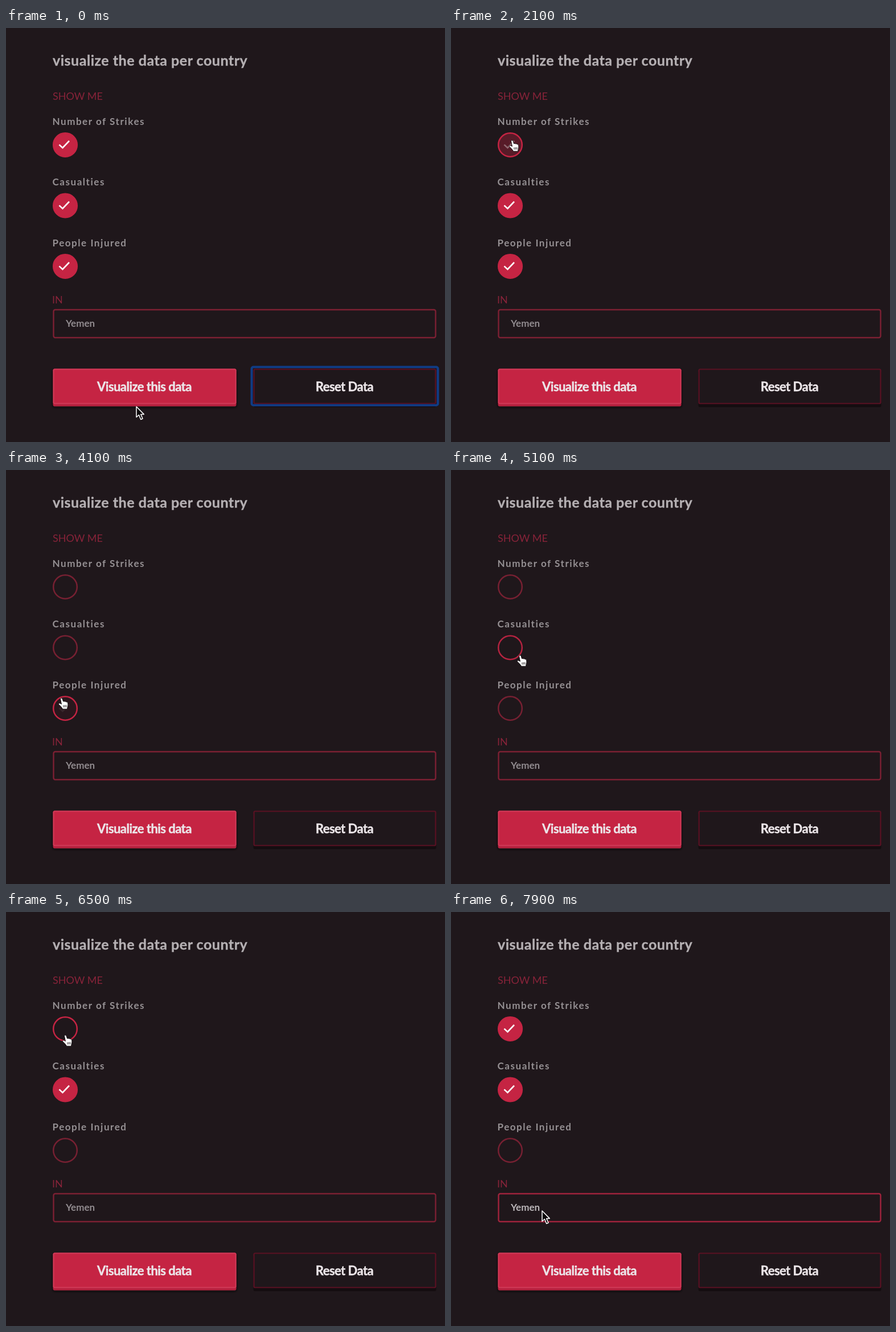
These frames come from a looping animation (771 by 726 pixels, 8000 ms). An HTML page:

```html
<!DOCTYPE html>
<html lang="en">
<head>
<meta charset="utf-8">
<style>
  html, body { margin: 0; height: 100%; overflow: hidden; background: #1f171b; }
  svg { display: block; width: 771px; height: 726px; font: 700 17px Lato, "Open Sans", sans-serif; }
  .title { font-size: 25px; letter-spacing: .52px; fill: #b5b0b3; stroke: #b5b0b3; stroke-width: .35px; }
  .head { font-size: 18px; font-weight: 400; fill: #872339; }
  .label { letter-spacing: 1.55px; fill: #959093; }
  .button { font-size: 22px; letter-spacing: -.55px; text-anchor: middle; fill: #ece6e9; stroke: #ece6e9; stroke-width: .45px; }
</style>
</head>
<body>
<svg viewBox="0 0 771 726">
  <defs>
    <filter id="soft" x="-10%" y="-30%" width="120%" height="160%"><feGaussianBlur stdDeviation="2"/></filter>
    <filter id="glow" x="-5%" y="-20%" width="110%" height="140%"><feGaussianBlur stdDeviation=".7"/></filter>
  </defs>

  <text class="title" x="82" y="66">visualize the data per country</text>
  <text class="head" x="82" y="126">SHOW ME</text>
  <text class="head" x="81" y="482.5">IN</text>
  <g id="checks"></g>

  <rect id="field" x="83.5" y="494" width="671" height="49" rx="3" fill="none" stroke-width="2.4"/>
  <text id="country" x="105" y="523.5">Yemen</text>

  <rect x="82.5" y="600" width="322" height="65" rx="3" fill="#0d080a" filter="url(#soft)"/>
  <rect x="82.5" y="597.5" width="322" height="66" rx="3" fill="#b7213f"/>
  <rect x="83.5" y="598.5" width="320" height="60" rx="2" fill="#c52443" stroke="#d13a58" stroke-width="2"/>
  <text class="button" x="243" y="636.5">Visualize this data</text>

  <rect x="434.5" y="602" width="321" height="63" rx="3" fill="#140d10"/>
  <rect x="435.5" y="598.5" width="319" height="60" rx="2" fill="#1f171b" stroke="#5a1123" stroke-width="2.2"/>
  <rect id="focus" x="431.5" y="594.5" width="327" height="67" rx="3" fill="none" stroke="#103c86" stroke-width="4" filter="url(#glow)"/>
  <text class="button" x="594.5" y="636.5">Reset Data</text>

  <path id="arrow" d="M0 0V18.5L4.4 14.5L7.7 22.5L11 21L7.7 13.4H13.2Z" fill="#0b0709" stroke="#fff" stroke-width="1.5" stroke-linejoin="round"/>
  <g id="hand" stroke="#120c0f" stroke-linejoin="round">
    <g transform="translate(0 -1.2)">
      <path d="M-1.6 1.2Q0-1.2 1.9 1L3.6 6.2Q5 4.8 6.4 6.4Q8.1 5.3 9.1 7.1Q11.1 6.2 11.6 8.7Q12.5 12.2 11.2 15.2L10.6 19.4H2.6Q.2 15-4.8 11Q-4.3 8.1-1.6 9.6L.4 10.8Z" fill="#fff"/>
      <path d="M4 12.5V16.5M6.4 12.3V16.4M8.8 12.1V16.3" stroke-width=".9"/>
    </g>
  </g>
</svg>
<script>
const LOOP = 8000, STEP = 100, FADE = 300, BLUR_AT = 1800;
const RED = [197, 36, 67], DIM = [119, 32, 50];
const el = id => document.getElementById(id);
const clamp = v => Math.max(0, Math.min(1, v));
const lerp = (a, b, k) => a + (b - a) * k;
const mix = (a, b, k) => `rgb(${a.map((v, i) => Math.round(lerp(v, b[i], k)))})`;

// the pointer eases from stop to stop, resting at some of them
const stops = [
  { at: 0, x: 229, y: 664 },
  { at: 600, x: 145, y: 54 },
  { at: 1000, x: 107, y: 198, rest: 1100 },
  { at: 2800, x: 107, y: 289, rest: 400 },
  { at: 3600, x: 97, y: 401, rest: 900 },
  { at: 5100, x: 121, y: 326 },
  { at: 5400, x: 105, y: 312, rest: 400 },
  { at: 6500, x: 104, y: 217, rest: 300 },
  { at: 7400, x: 150, y: 643 },
  { at: 7900, x: 160, y: 524 }
];

// every row starts checked and toggles at its flip times
const rows = [
  { name: "Number of Strikes", flips: [1900, 6700] },
  { name: "Casualties", flips: [3100, 5700] },
  { name: "People Injured", flips: [3820] }
];
rows.forEach((row, i) => {
  row.y = 205 + 106.5 * i;
  row.box = [82, row.y - 22, 126, row.y + 22];
});
const FIELD = [82, 493, 755, 543], BUTTON = [82, 597, 404, 663];

el("checks").innerHTML = rows.map(({ name, y }) => `
  <text class="label" x="81.5" y="${y - 35.5}">${name}</text>
  <g transform="translate(104 ${y})">
    <circle r="20.8" stroke-width="2.5"/>
    <path d="M-10.6-.4L-4.6 5.2L7-7" fill="none" stroke="#fff" stroke-width="2.6"/>
  </g>`).join("");
const circles = document.querySelectorAll("#checks circle");
const ticks = document.querySelectorAll("#checks path");

function pointer(t) {
  const i = Math.max(0, stops.findLastIndex(s => s.at <= t));
  const a = stops[i], b = stops[i + 1] || a;
  const leave = a.at + (a.rest || 0);
  const u = clamp((t - leave) / (b.at - leave || 1)), k = u * u * (3 - 2 * u);
  return [lerp(a.x, b.x, k), lerp(a.y, b.y, k)];
}

const inside = ([x, y], [l, t, r, b]) => x >= l && x <= r && y >= t && y <= b;

// hover strength: share of the last 150 ms spent inside the box
function hover(box, t) {
  let hits = 0;
  for (let i = 0; i < 10; i++) hits += inside(pointer(t - i * 15), box);
  return hits / 10;
}

const checked = (flips, t) =>
  flips.reduce((v, at, i) => lerp(v, i % 2, clamp((t - at) / FADE)), 1);

function draw(now) {
  const t = Math.floor(now % LOOP / STEP) * STEP;
  const spot = pointer(t);

  rows.forEach(({ box, flips }, i) => {
    const on = checked(flips, t);
    circles[i].setAttribute("fill", `rgba(${RED},${on})`);
    circles[i].setAttribute("stroke", mix(DIM, RED, Math.max(on, hover(box, t))));
    ticks[i].setAttribute("opacity", on);
  });

  const lit = hover(FIELD, t);
  el("field").setAttribute("stroke", mix([124, 32, 51], [164, 35, 61], lit));
  el("country").setAttribute("fill", mix([145, 139, 143], [192, 187, 190], lit));
  el("focus").setAttribute("visibility", t < BLUR_AT ? "visible" : "hidden");

  const pointing = [...rows.map(r => r.box), BUTTON].some(box => inside(spot, box));
  for (const id of ["arrow", "hand"]) {
    el(id).setAttribute("transform", `translate(${spot})`);
    el(id).setAttribute("visibility", (id === "hand") === pointing ? "visible" : "hidden");
  }
}

const start = performance.now();
(function tick() {
  draw(performance.now() - start);
  requestAnimationFrame(tick);
})();
</script>
</body>
</html>
```
